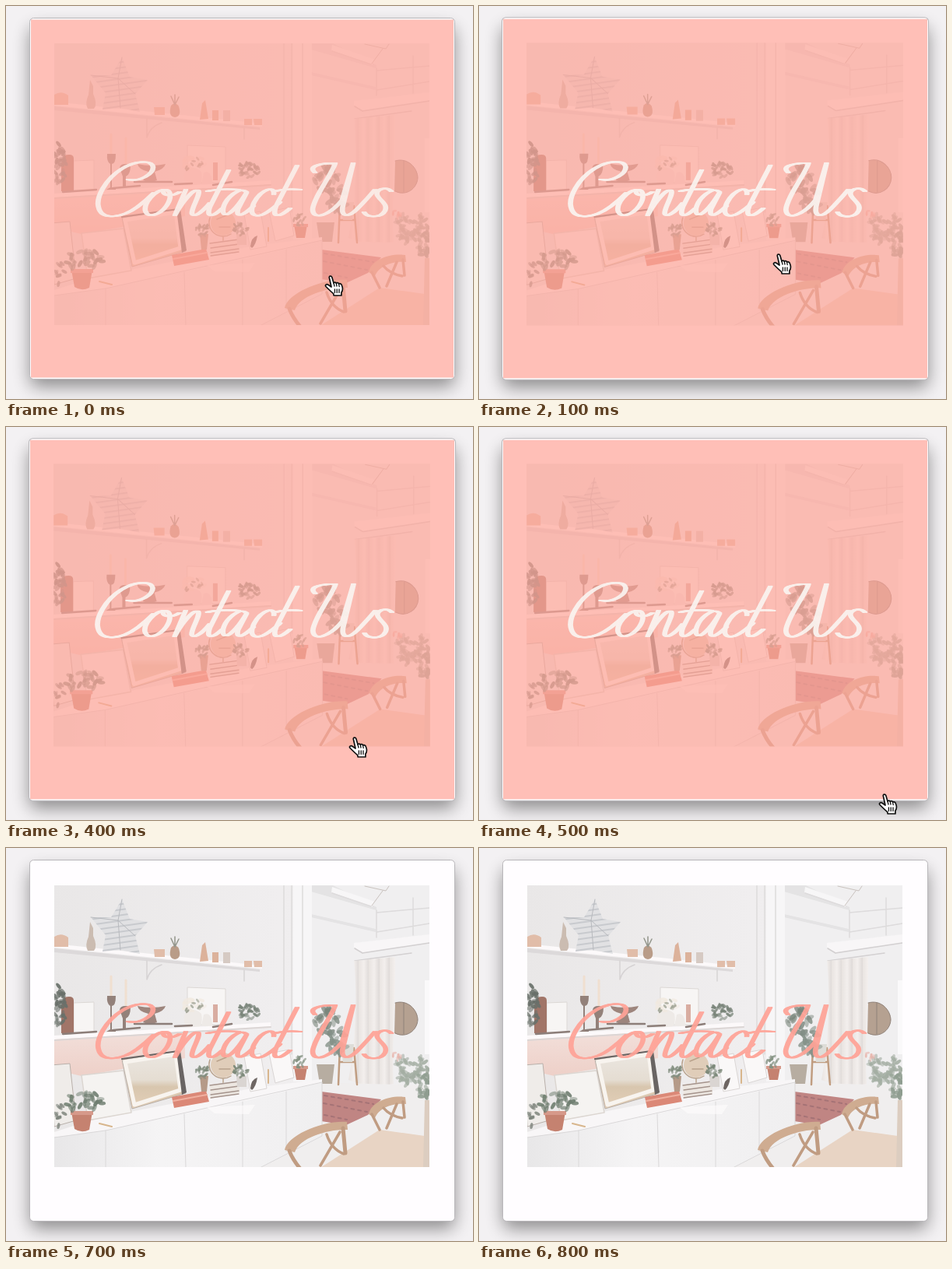
Recreate the animation shown at these times as an HTML page. Size 600 by 505 pixels, loop 0.9 s.

```html
<!DOCTYPE html>
<html lang="en">
<head>
<meta charset="utf-8">
<title>Contact card</title>
<style>
  html, body { margin: 0; width: 100%; height: 100%; overflow: hidden; background: #f3f1f3; }
  svg { display: block; width: 100vw; height: 100vh; }
  .line { fill: none; stroke-linecap: round; stroke-linejoin: round; }
</style>
</head>
<body>
<svg viewBox="0 0 600 505" role="img" aria-label="Contact Us">
  <defs>
    <filter id="blur" x="-20%" y="-20%" width="140%" height="140%"><feGaussianBlur stdDeviation="11"/></filter>
    <filter id="soft"><feGaussianBlur stdDeviation=".6"/></filter>
    <clipPath id="photoClip"><path d="M62 48H544V410H62Z"/></clipPath>
    <linearGradient id="wall"><stop stop-color="#e9e7e7"/><stop offset=".6" stop-color="#f0eeef"/><stop offset="1" stop-color="#eceaeb"/></linearGradient>
    <linearGradient id="blush" x2="0" y2="1"><stop stop-color="#f2dfda"/><stop offset="1" stop-color="#eed0c8"/></linearGradient>
    <linearGradient id="front"><stop stop-color="#e8e7e8"/><stop offset=".4" stop-color="#f5f4f5"/><stop offset="1" stop-color="#f0eff0"/></linearGradient>
    <linearGradient id="cloth" x2=".22" spreadMethod="repeat"><stop stop-color="#e9e4e1"/><stop offset=".5" stop-color="#f3efed"/><stop offset="1" stop-color="#dfdad8"/></linearGradient>
    <linearGradient id="scenery" x2="0" y2="1"><stop stop-color="#ebe7e2"/><stop offset=".5" stop-color="#e5ddd2"/><stop offset=".62" stop-color="#d8c6ae"/><stop offset="1" stop-color="#e3cfb8"/></linearGradient>
    <pattern id="stripes" width="7" height="7" patternUnits="userSpaceOnUse" patternTransform="rotate(-8)"><path fill="#e1e1e3" d="M0 0H7V7H0Z"/><path fill="#c8cace" d="M0 0H7V2H0Z"/></pattern>
    <path id="lettering" class="line" d="
      M157 223C173 226 189 216 189 207C187 197 166 199 149 209C128 222 115 246 119 259C123 276 150 272 169 258Q181 249 190 240
      M203 236C190 238 177 253 179 263C182 274 198 268 206 257C213 247 213 235 203 236C199 244 212 246 223 239
      M231 236L217 269C226 252 241 234 247 237C251 241 237 261 239 267C242 273 254 263 262 253
      M286 211L262 258C257 271 264 273 278 260M259 238Q276 234 299 236
      M309 239C300 231 282 247 279 260C277 275 291 269 309 240L298 261C295 273 304 270 318 257
      M344 242C346 231 329 234 319 252C310 270 322 274 337 264Q346 258 352 252
      M374 205L347 257C341 272 350 273 365 260M345 238Q360 234 378 236
      M397 214C388 207 400 202 423 202C419 216 396 244 394 261C394 276 415 270 432 249L446 202L433 256C429 272 440 272 451 261Q463 249 474 236
      M495 238C488 231 474 236 477 243C480 250 491 254 487 263C482 273 464 272 460 265"/>
  </defs>

  <g id="card">
    <rect x="31" y="28" width="545" height="461" rx="8" fill="#000" opacity=".42" filter="url(#blur)"/>
    <rect x="30.5" y="15.5" width="546" height="464" rx="5" fill="#fffdff" stroke="#b9b7ba"/>

    <g clip-path="url(#photoClip)"><g filter="url(#soft)">
      <path fill="url(#wall)" d="M55 40H550V420H55Z"/>
      <!-- room behind the column -->
      <path fill="#f0eff0" d="M392 48H545V310H392Z"/>
      <path fill="#e4e3e4" d="M392 48H420L476 76V80L392 56ZM392 85L475 104V108L392 89Z"/>
      <path fill="#f7f6f7" d="M419 50L474 69L470 76L418 57ZM369 48H393V300H369Z"/>
      <path class="line" stroke="#dddbdc" stroke-width="1.5" d="M419 58L469 75M476 80V115M476 83L544 77M476 108L544 97M523 64V112M357 48V235M367 48V265M381 48V270"/>
      <path class="line" stroke="#c9c2be" d="M461 49L488 55L492 49M484 55L470 74"/>
      <path fill="#f8f6f7" d="M447 122L544 111V121L458 134L447 128Z"/>
      <path class="line" stroke="#d3d0d1" stroke-width="1.5" d="M448 129L458 135L544 122M448 145L521 135"/>
      <path fill="url(#cloth)" d="M447 145L500 140C501 190 495 253 498 303Q470 311 440 298C449 251 452 190 447 145Z"/>
      <path fill="#b5a191" d="M500 199C517 194 529 209 529 221C528 235 514 245 499 238Z"/>
      <path class="line" stroke="#8f8178" d="M500 199C517 194 529 209 529 221C528 235 514 245 500 238M511 199V239"/>
      <path fill="#faf9fa" d="M538 170H545V265H538Z"/>
      <!-- floor, rug -->
      <path fill="#f0eeee" d="M392 301L545 305V410H320Z"/>
      <path fill="#c08583" d="M405 313L482 323L465 343L437 356L405 351Z"/>
      <path class="line" stroke="#a57376" stroke-width="2" stroke-dasharray="4 5" d="M409 318L472 329M408 328L464 339M409 343L438 349"/>
      <path fill="#b7ada1" d="M399 278H422L419 303H403Z"/>
      <path class="line" stroke="#c09d81" stroke-width="2.5" d="M429 255L427 304M447 257L451 304M430 275H447"/>
      <path fill="#deddd8" d="M430 252H447L445 275H433Z"/>

      <!-- upper shelf -->
      <path fill="#dcd9da" d="M62 129L326 156V159L62 134Z"/>
      <path fill="#fcf9fa" d="M62 123L329 151V155L62 128Z"/>
      <path class="line" stroke="#d6d3d4" stroke-width="1.5" d="M181 145V169Q185 155 200 150M306 157V171"/>
      <path fill="url(#stripes)" d="M149 66L159 91L182 95L166 113L172 136L147 131L124 133L128 112L109 89L135 89Z"/>
      <path class="line" stroke="#b8babe" d="M149 66L144 93L109 89M144 93L166 113M144 93L147 131"/>
      <path fill="#e1bda9" d="M62 114Q71 108 80 115V127H62ZM190 130H204V140H191ZM306 145H316V153H306ZM318 145H329V153H319Z"/>
      <path fill="#cbbcb1" d="M108 95L112 103V113Q118 126 113 132H105Q101 125 106 114Z"/>
      <path fill="#b99c88" d="M212 128Q217 122 222 129Q226 142 217 143Q208 142 212 128Z"/>
      <path class="line" stroke="#92958b" stroke-width="1.5" d="M217 127L212 116M217 127V114M217 127L222 117"/>
      <path fill="#dcb29b" d="M252 125L256 121L260 145L249 146ZM265 134H273V147H265Z"/>
      <path fill="#d6cac3" d="M279 134H288V148H279Z"/>

      <!-- lower shelf and blush panel -->
      <path fill="url(#blush)" d="M62 242L230 236V270L97 293L62 285Z"/>
      <path fill="#f7f5f4" stroke="#dcd8d5" d="M87 199L113 198V237H87ZM233 179L282 181V227H233Z"/>
      <path fill="#a17568" d="M75 192Q87 189 87 196V238H71V203Z"/>
      <path class="line" stroke="#f0dfd0" stroke-width="3" d="M135 165V193M154 170V202"/>
      <path fill="#93817a" d="M130 190H141Q141 203 136 203V233H141V236H129L134 233V203Q129 200 130 190ZM146 208Q147 201 160 204Q160 217 154 219V233H150V219Z"/>
      <path fill="#9d857d" d="M169 203Q187 207 205 203Q203 210 191 213L194 224Q185 228 176 224L183 213Q170 210 169 203Z"/>
      <path fill="#eeeae7" d="M230 213Q241 203 251 213Q254 229 245 232H234Q226 225 230 213ZM254 214Q265 210 265 229H251Z"/>
      <path fill="#d9ada1" d="M266 201H272V224H266Z"/>
      <path fill="#fcf9fa" d="M62 241L340 224V229L62 246Z"/>
      <path class="line" stroke="#8c7e79" stroke-width="2.5" d="M73 239L116 236M138 234L172 231M165 226H213M217 229L239 228M266 230L290 226"/>
      <path class="line" stroke="#dcd6d5" stroke-width="2" d="M62 247L340 230"/>

      <!-- cabinet -->
      <path fill="#f8f6f7" d="M62 365L118 347L320 308L406 297V302L304 326L128 363L62 372Z"/>
      <path fill="url(#front)" d="M62 372L128 363L304 326L406 301V370L328 410H62Z"/>
      <path class="line" stroke="#dad8d9" d="M128 363V410M229 342L231 410M304 326V410M360 313V390M62 372L128 363L406 301V370L326 411"/>
      <path fill="#fffdfd" opacity=".6" d="M258 333L320 330L312 342L268 341Z"/>

      <!-- leaning pictures and books -->
      <path fill="#efece9" stroke="#b9b0aa" d="M58 279L82 277L90 350L62 358Z"/>
      <path fill="#f5f3f1" stroke="#dcd6d1" stroke-width="1.5" d="M97 292L151 286L161 340L105 350Z"/>
      <path fill="url(#scenery)" stroke="#b8aea6" d="M149 272L222 261L231 315L162 335Z"/>
      <path class="line" stroke="#f8f4ef" stroke-width="5" d="M153 275L218 265L224 311L165 330Z"/>
      <path class="line" stroke="#696463" stroke-width="2" d="M149 271L221 261"/>
      <path fill="#696463" d="M219 261H224L232 314L226 317Z"/>
      <path fill="#db8877" d="M213 320L257 312L261 326L216 334Z"/>
      <path class="line" stroke="#f0b0a0" stroke-width="2" d="M215 325L258 317"/>
      <path fill="#faf8f8" stroke="#dad6d5" d="M306 268L327 264L335 309L314 313ZM338 264L364 259L370 295L346 302Z"/>
      <circle cx="279" cy="279" r="16" fill="#e0cdb9"/>
      <path class="line" stroke="#b9a28c" stroke-width="1.5" d="M262 272A18 18 0 0 0 289 293M279 297V302M271 274L283 269M274 284H288"/>
      <path fill="#ede7e1" d="M262 304L300 299V315L263 322Z"/>
      <path class="line" stroke="#a5948d" stroke-width="1.3" d="M262 305L299 300M263 311L299 306M263 317L299 312M263 321L299 316"/>
      <path fill="#b59a88" d="M249 293H260L258 313H251Z"/>
      <path fill="#dad5d2" d="M296 293H309V307H297Z"/>
      <path fill="#6e6663" d="M314 309Q315 297 323 295Q321 307 316 311Z"/>
      <path class="line" stroke="#d8b68d" stroke-width="2" d="M120 354L136 358M337 285V302"/>
      <path fill="#c58270" d="M84 339H111L107 362Q97 367 88 361ZM370 281H387L384 298H373Z"/>
      <path fill="#d6998a" d="M83 338H112V343H83ZM369 280H388V284H369Z"/>
      <g id="plants"></g>

      <!-- table and chairs -->
      <path fill="#e8d4c4" d="M402 412L480 362L545 371V412Z"/>
      <path fill="#dccdc0" d="M538 324H545V410H536Z"/>
      <g fill="#cfac91">
        <path d="M358 388C361 370 405 350 438 352L439 362C414 361 377 372 371 391Z"/>
        <path d="M466 342C469 325 496 317 513 320L514 329C497 327 479 334 474 347Z"/>
      </g>
      <path class="line" stroke="#c09c82" stroke-width="5" d="M364 389Q368 400 378 412M433 360L436 392"/>
      <path class="line" stroke="#c09c82" stroke-width="3.5" d="M429 365L404 408M412 368Q418 387 434 393M470 342L480 362M510 326L512 346M502 329L489 360M485 334Q493 344 509 347"/>
    </g></g>

    <path id="tint" fill="#ffa599" d="M32 17.5H575V477.5H32Z"/>
    <g id="title"></g>
  </g>

  <g id="cursor" stroke="#111" stroke-linejoin="round" stroke-linecap="round">
    <path fill="#fff" stroke-width="1.7" d="M5.3 3C4.8.8 8 .2 8.8 2.5L11 10C11.5 8.7 14 8.8 14.3 10.3C15 9.2 17.3 9.5 17.6 11.2C18.6 10.2 20.8 10.8 21.4 12.8C23 17 22.7 20 20.9 22V26H11.2L10.6 23.5C7.5 21 4 17.5 1 14.5C-.5 12.5 1.8 10.8 4 12.2L8 15Z"/>
    <path class="line" stroke-width="1.3" d="M11 10L12 14M14.3 10.5L15 14M17.6 11.3L18.2 14.5M12.4 18V22.5M15.2 18V22.5M18 18V22.5"/>
  </g>
</svg>

<script>
const byId = id => document.getElementById(id);
const [card, tint, title, cursor, plants] = ['card', 'tint', 'title', 'cursor', 'plants'].map(byId);

let seed = 11;
const random = () => (seed = seed * 16807 % 2147483647) / 2147483647;

function foliage(x, y, rx, ry, count, size, color) {
  let leaves = '';
  for (let i = 0; i < count; i++) {
    const angle = random() * 2 * Math.PI, reach = Math.sqrt(random());
    const cx = x + rx * reach * Math.cos(angle), cy = y + ry * reach * Math.sin(angle);
    leaves += `<ellipse cx="${cx}" cy="${cy}" rx="${size}" ry="${size * .48}" opacity="${.45 + random() * .5}" transform="rotate(${random() * 180} ${cx} ${cy})"/>`;
  }
  plants.innerHTML += `<g fill="${color}">${leaves}</g>`;
}

foliage(69, 202, 8, 28, 32, 4.5, '#69706a');
foliage(70, 342, 7, 17, 10, 4, '#7b827a');
foliage(102, 327, 24, 13, 26, 5, '#6f7e70');
foliage(242, 201, 15, 8, 18, 4, '#f1e9df');
foliage(243, 204, 16, 9, 9, 3, '#9fa394');
foliage(311, 211, 15, 9, 32, 3.5, '#788378');
foliage(253, 288, 9, 9, 22, 3, '#7f8b7c');
foliage(302, 286, 10, 8, 22, 3, '#7a8777');
foliage(377, 274, 8, 9, 16, 3, '#829080');
foliage(411, 222, 15, 18, 24, 6, '#7a867c');
foliage(426, 247, 13, 18, 22, 6, '#87938a');
foliage(521, 285, 22, 20, 60, 4.5, '#a4aea3');
foliage(537, 306, 9, 17, 22, 5, '#8f9d90');
foliage(503, 267, 6, 5, 8, 3, '#e8b5ad');

// Offset copies imitate a broad pen held level.
for (let x = -2.4; x <= 2.4; x += 1.2) title.innerHTML += `<use href="#lettering" x="${x}"/>`;
title.setAttribute('stroke-width', 1.9);
title.setAttribute('opacity', .93);

const STEP = 100;
const hover = { tint: .7, white: 1, scale: 1.0037 };
const rest = { tint: 0, white: 0, scale: 1 };
const poses = [
  { ...hover, white: .92, scale: 1, at: [410, 346] },
  { ...hover, at: [378, 318] },
  { ...hover, at: [354, 304] },
  { ...hover, at: [369, 322] },
  { ...hover, at: [441, 398] },
  { ...hover, at: [514, 471] },
  { ...hover, tint: .53, white: .68 },
  rest,
  rest
];

function draw(now) {
  const pose = poses[Math.floor(now / STEP) % poses.length];
  const mix = (from, to) => Math.round(from + (to - from) * pose.white);
  card.setAttribute('transform', `translate(303.5 247.5) scale(${pose.scale}) translate(-303.5 -247.5)`);
  tint.setAttribute('opacity', pose.tint);
  title.setAttribute('stroke', `rgb(${mix(255, 250)},${mix(163, 244)},${mix(151, 240)})`);
  cursor.setAttribute('visibility', pose.at ? 'visible' : 'hidden');
  if (pose.at) cursor.setAttribute('transform', `translate(${pose.at})`);
}

const start = performance.now();
function tick() {
  draw(performance.now() - start);
  requestAnimationFrame(tick);
}
tick();
</script>
</body>
</html>
```
